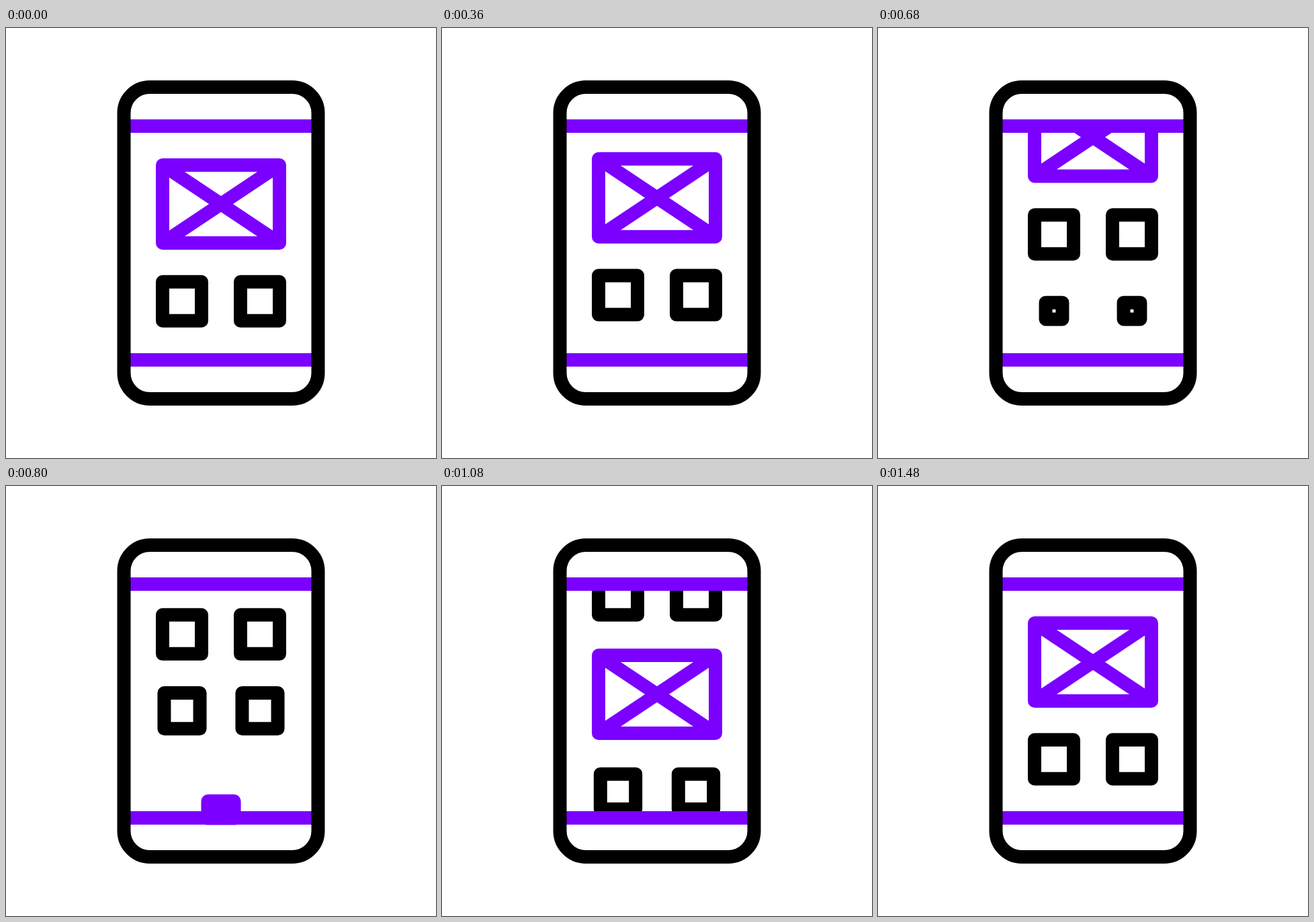
Animation, 640 px wide and 640 px high, one loop 2 s. Source, as an HTML page with a canvas:

```html
<!DOCTYPE html>
<html lang="en">
<head>
<meta charset="utf-8">
<title>Scrolling phone</title>
<style>
  html, body { margin: 0; height: 100%; overflow: hidden; background: #fff; }
  canvas { display: block; }
</style>
</head>
<body>
<canvas id="stage" width="640" height="640"></canvas>
<script>
const ctx = document.getElementById('stage').getContext('2d');
const PURPLE = '#7b00ff', BLACK = '#000';
const LOOP = 2000, STEP = 40;
const SCROLL = { start: 160, length: 1320, distance: 406 };
const GROW = 460;

// Symmetric cubic-bezier(.64, 0, .36, 1), solved by bisection
function ease(x) {
  if (x <= 0) return 0;
  if (x >= 1) return 1;
  let lo = 0, hi = 1;
  for (let i = 0; i < 24; i++) {
    const s = (lo + hi) / 2, r = 1 - s;
    if (1.92 * s * r * r + 1.08 * s * s * r + s * s * s < x) lo = s;
    else hi = s;
  }
  return lo * lo * (3 - 2 * lo);
}

function stroke(color, build) {
  ctx.strokeStyle = color;
  ctx.beginPath();
  build();
  ctx.stroke();
}

function box(cx, cy, w, h) {
  ctx.rect(cx - w / 2, cy - h / 2, w, h);
}

function line(x1, y1, x2, y2) {
  ctx.moveTo(x1, y1);
  ctx.lineTo(x2, y2);
}

function picture(y, scale) {
  const w = 174 * scale, h = 116 * scale;
  stroke(PURPLE, () => {
    box(320, y, w, h);
    line(320 - w / 2, y - h / 2, 320 + w / 2, y + h / 2);
    line(320 - w / 2, y + h / 2, 320 + w / 2, y - h / 2);
  });
}

function tiles(y, scale) {
  const size = 58 * scale;
  stroke(BLACK, () => {
    box(262, y, size, size);
    box(378, y, size, size);
  });
}

// Each row: drawing, resting height, time at which it starts to grow
const rows = [
  [picture, 262, -GROW],
  [tiles, 406.8, -GROW],
  [tiles, 520.6, 462],
  [picture, 262 + SCROLL.distance, 624],
  [tiles, 406.8 + SCROLL.distance, 749],
];

function draw(t) {
  const scroll = SCROLL.distance * ease((t - SCROLL.start) / SCROLL.length);
  ctx.fillStyle = '#fff';
  ctx.fillRect(0, 0, 640, 640);
  ctx.lineWidth = 20;
  ctx.lineJoin = 'round';

  ctx.save();
  ctx.beginPath();
  ctx.rect(176, 146, 288, 358.6);
  ctx.clip();
  for (const [shape, y, start] of rows) {
    const scale = ease((t - start) / GROW);
    if (scale > 0) shape(y - scroll, scale);
  }
  ctx.restore();

  stroke(PURPLE, () => {
    line(176, 146, 464, 146);
    line(176, 494, 464, 494);
  });
  stroke(BLACK, () => ctx.roundRect(175.5, 88, 289, 464, 38.5));
}

const began = performance.now();
function tick() {
  const t = (performance.now() - began) % LOOP;
  draw(Math.floor(t / STEP + 0.1) * STEP);
  requestAnimationFrame(tick);
}
tick();
</script>
</body>
</html>
```
